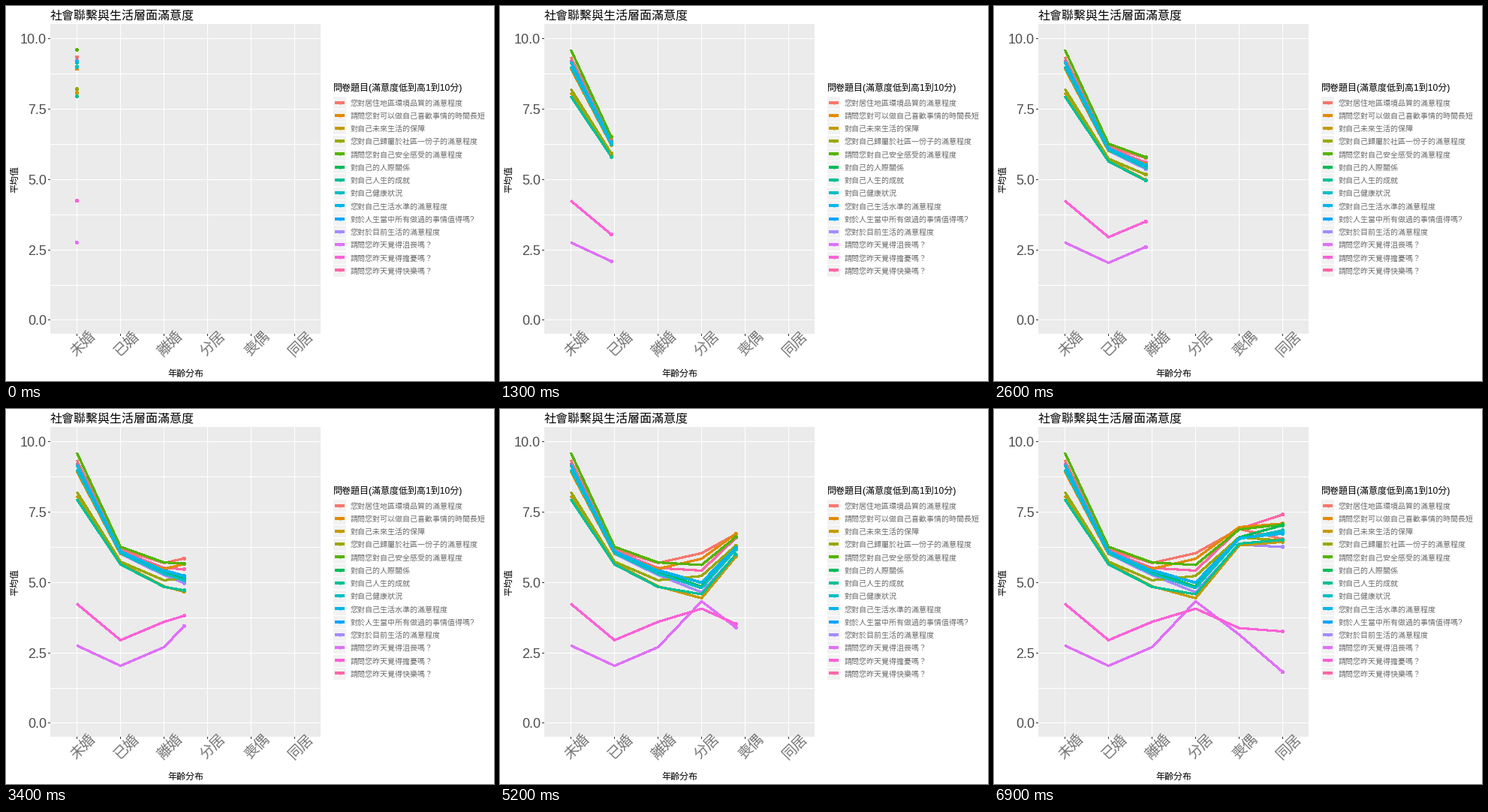
Write a matplotlib script that moves like this. It is 650 px wide and 500 px high and loops after 10 s.

```python
import numpy as np
import matplotlib.pyplot as plt
from matplotlib.animation import FuncAnimation
from matplotlib.patches import Rectangle

W, H, DPI = 650, 500, 100
PT = 72 / DPI                       # points per pixel
LAST, FRAMES, INTERVAL = 69, 100, 100
FONT = ["Liberation Sans", "Noto Sans CJK JP"]
GROUPS = ["未婚", "已婚", "離婚", "分居", "喪偶", "同居"]
STEPS = np.arange(len(GROUPS))
KNOTS = np.round(np.linspace(0, LAST, len(GROUPS)))   # frame that reaches each group

TREND = np.array([8.90, 6.00, 5.33, 5.12, 6.63, 6.76])


def near(start, mid, end):
    """Common trend, shifted at three groups and blended in between."""
    return TREND + [start, 0.38 * start, 0.4 * start + 0.2 * mid,
                    mid, 0.35 * mid + 0.25 * end, end]


ITEMS = [
    ("您對居住地區環境品質的滿意程度", near(0.44, 0.92, -0.22)),
    ("請問您對可以做自己喜歡事情的時間長短", near(0.03, 0.72, 0.33)),
    ("對自己未來生活的保障", near(-0.83, -0.68, -0.32)),
    ("您對自己歸屬於社區一份子的滿意程度", near(-0.69, 0.11, -0.27)),
    ("請問您對自己安全感受的滿意程度", near(0.70, 0.50, 0.30)),
    ("對自己的人際關係", near(0.26, -0.27, 0.27)),
    ("對自己人生的成就", near(-0.95, -0.54, -0.25)),
    ("對自己健康狀況", near(0.10, -0.32, 0.09)),
    ("您對自己生活水準的滿意程度", near(0.28, -0.14, -0.03)),
    ("對於人生當中所有做過的事情值得嗎?", near(0.33, -0.12, 0.0)),
    ("您對於目前生活的滿意程度", near(0.06, -0.47, -0.50)),
    ("請問您昨天覺得沮喪嗎？", np.array([2.76, 2.04, 2.70, 4.33, 3.15, 1.82])),
    ("請問您昨天覺得擔憂嗎？", np.array([4.24, 2.95, 3.60, 4.07, 3.38, 3.26])),
    ("請問您昨天覺得快樂嗎？", near(0.31, 0.30, 0.65)),
]
N = len(ITEMS)
# stacking follows the text order of the item numbers: 1, 10, 11, ... 2, 3
ORDER = sorted(range(N), key=lambda i: str(i + 1))


def hcl(hue, chroma=100, light=65):
    """Polar CIE-LUV to sRGB."""
    a = np.radians(hue)
    y = ((light + 16) / 116) ** 3
    u = chroma * np.cos(a) / (13 * light) + 0.19784
    v = chroma * np.sin(a) / (13 * light) + 0.46834
    x = 9 * y * u / (4 * v)
    z = 3 * y / v - x / 3 - 5 * y
    rgb = np.array([3.2405 * x - 1.5372 * y - 0.4985 * z,
                    -0.9693 * x + 1.8760 * y + 0.0416 * z,
                    0.0556 * x - 0.2040 * y + 1.0573 * z]).clip(0, 1)
    return np.where(rgb > 0.00304, 1.055 * rgb ** (1 / 2.4) - 0.055, 12.92 * rgb).clip(0, 1)


COLORS = [hcl(15 + 360 * i / N) for i in range(N)]


def px(u):
    return 94.5 + 58 * u


def py(v):
    return 419 - 37.55 * v


fig = plt.figure(figsize=(W / DPI, H / DPI), dpi=DPI, facecolor="white")
ax = fig.add_axes([0, 0, 1, 1])
ax.set_xlim(0, W)
ax.set_ylim(H, 0)
ax.axis("off")


def box(x, y, w, h, color, z=0):
    ax.add_patch(Rectangle((x, y), w, h, fc=color, ec="none", lw=0,
                           antialiased=False, zorder=z))


def stroke(xs, ys, color, z):
    return ax.plot(xs, ys, color=color, lw=2.1 * PT, antialiased=False, zorder=z,
                   solid_capstyle="butt", solid_joinstyle="round")[0]


def dots(xs, ys, colors, z):
    return ax.scatter(xs, ys, s=(4.2 * PT) ** 2, c=colors, linewidths=0,
                      antialiased=False, zorder=z)


def label(x, y, s, size, color="black", ha="left", angle=0):
    """Text whose glyphs are centred on y, measured across the baseline."""
    a = np.radians(angle)
    off = 0.37 * size
    ax.text(x + off * np.sin(a), y + off * np.cos(a), s, fontsize=size * PT, color=color,
            ha=ha, va="baseline", rotation=angle, rotation_mode="anchor",
            family=FONT, zorder=9)


# panel, grid and ticks
box(59, 24, 360, 413, "#EBEBEB")
for v in np.arange(0, 10.1, 1.25):
    box(59, round(py(v) - 0.5), 360, 1, "white", 1)
for v in np.arange(0, 10.1, 2.5):
    y = round(py(v) - 0.5)
    box(56, y, 3, 1, "#333333", 1)
    label(54, y + 0.8, f"{v:.1f}", 18, "#4D4D4D", "right")
for i, name in enumerate(GROUPS):
    x = int(px(i))
    box(x, 24, 1, 413, "white", 1)
    box(x, 437, 1, 3, "#333333", 1)
    label(x + 7, 449.5, name, 19, "#757575", "center", 45)

# titles
label(58.5, 12.5, "社會聯繫與生活層面滿意度", 16)
label(239, 489, "年齡分布", 12, ha="center")
label(11, 231, "平均值", 12, ha="center", angle=90)
label(436, 108.5, "問卷題目(滿意度低到高1到10分)", 12)

# legend
for i, (text, _) in enumerate(ITEMS):
    y = 128.5 + 17.23 * i
    box(436, round(y - 8.6) + 1, 17, 16, "#F2F2F2")
    stroke([438, 451], [y, y], COLORS[i], 3)
    dots([444.5], [y], [COLORS[i]], 4)
    label(459, y + 0.5, text, 10, "#6A6A6A")

lines = [stroke([], [], COLORS[i], 5) for i in ORDER]
heads = dots(np.zeros(N), np.zeros(N), [COLORS[i] for i in ORDER], 6)


def update(frame):
    n = min(frame, LAST)
    u = np.interp(n, KNOTS, STEPS)
    k = np.searchsorted(KNOTS, n, side="right")
    xs = px(np.append(STEPS[:k], u))
    tips = []
    for line, i in zip(lines, ORDER):
        means = ITEMS[i][1]
        v = np.interp(u, STEPS, means)
        line.set_data(xs, py(np.append(means[:k], v)))
        tips.append((px(u), py(v)))
    heads.set_offsets(tips)
    return [*lines, heads]


anim = FuncAnimation(fig, update, frames=FRAMES, interval=INTERVAL,
                     repeat=True, repeat_delay=0, blit=False)
plt.show()
```
